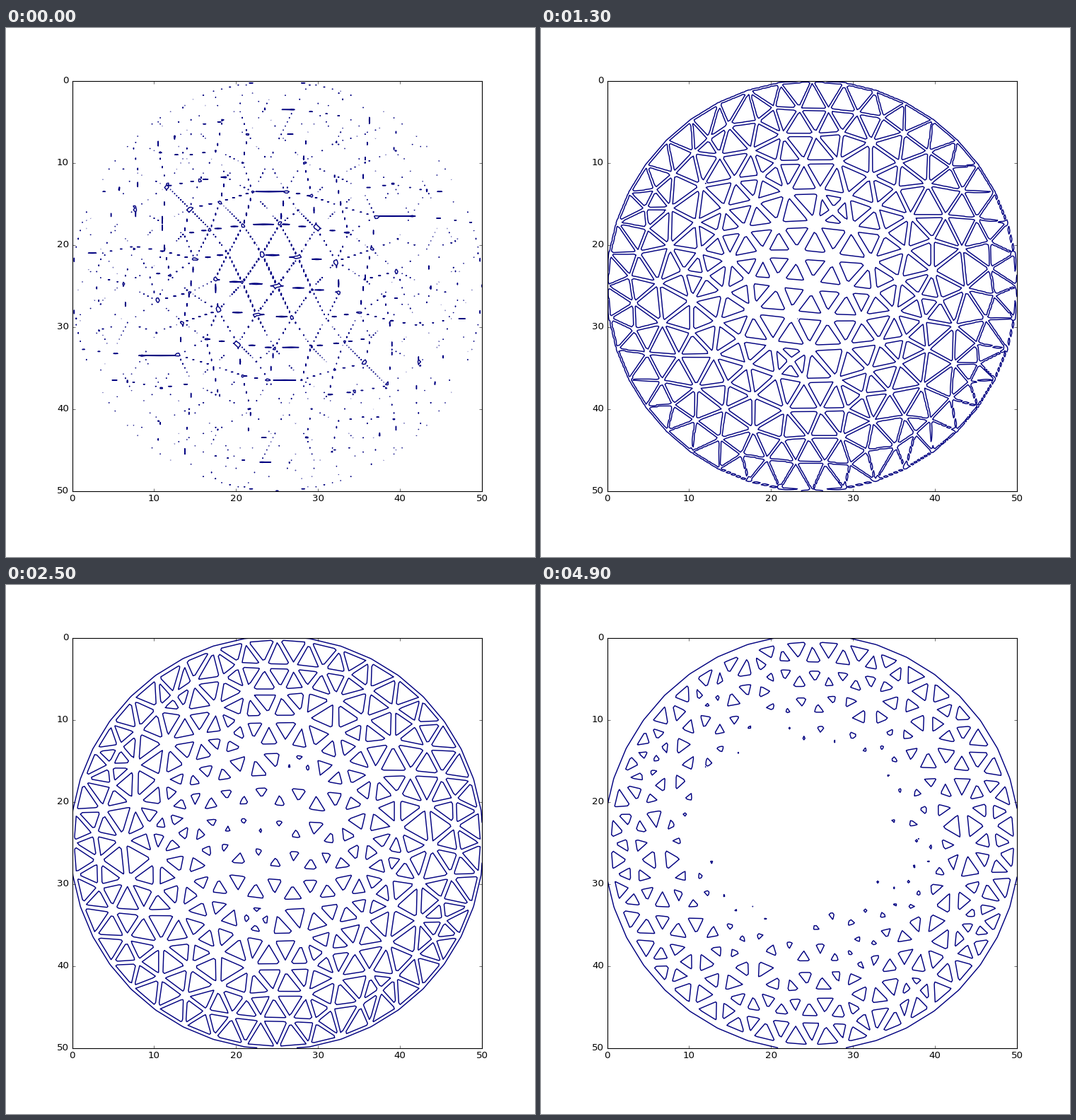
Animation, 748 px wide and 748 px high, one loop 5 s. Source, as a matplotlib script:

```python
import numpy as np
import matplotlib.pyplot as plt
from matplotlib.animation import FuncAnimation
from matplotlib.tri import Triangulation

plt.style.use("classic")
plt.rcParams.update({"font.family": "DejaVu Sans", "font.size": 12,
                     "figure.facecolor": "white"})

SIZE, DPI = 748, 80
FRAMES, INTERVAL = 50, 100
RADIUS = 25.0
NAVY = (0, 0, 0.5)


def ring(half, radius, start, warp=0, lag=0, wobble=0, wave=1, phase=0):
    """Joints around the centre, equal under a half turn.

    Angles (degrees, clockwise from the top) are bunched by warp and lag;
    wobble moves neighbours in and out by turns.
    """
    k = np.arange(half)
    base = start + 180 * k / half
    theta = np.radians(base + warp * np.sin(np.radians(2 * base - lag)))
    r = radius + wobble * (-1.0) ** k * np.sin(np.radians(wave * base + phase))
    offset = np.column_stack([r * np.sin(theta), -r * np.cos(theta)])
    return RADIUS + np.vstack([offset, -offset])


def relax(points, fixed, rounds=3, pull=0.5):
    """Ease the free joints towards the mean of their neighbours."""
    for _ in range(rounds):
        edges = Triangulation(points[:, 0], points[:, 1]).edges
        total = np.zeros_like(points)
        count = np.zeros((len(points), 1))
        for i, j in (edges.T, edges.T[::-1]):
            np.add.at(total, i, points[j])
            np.add.at(count, i, 1)
        points[fixed:] += pull * (total / count - points)[fixed:]
    return points


def build_mesh():
    rim = ring(20, RADIUS, 0)
    inner = [
        ring(22, 21.8, 7.9, warp=2.7, lag=80, wobble=-0.6, phase=90),
        ring(14, 18.6, 0, warp=-3.1, wobble=0.7, wave=2),
        ring(14, 15.6, 2, warp=3.8, lag=85, wobble=-1.1),
        ring(12, 11.7, 3.5, warp=6.7, lag=20, wobble=1.2),
        ring(6, 7.8, 6.1, wobble=-0.6, wave=2, phase=90),
        ring(1, 9.2, 16),
        ring(3, 4.4, 36.8),
        [(RADIUS, RADIUS)],
    ]
    points = relax(np.vstack([rim, *inner]), fixed=len(rim))
    return points, Triangulation(points[:, 0], points[:, 1]).edges


def strut_distance(x, y, points, edges):
    """Distance from each grid position to the nearest strut."""
    nearest = np.full(x.shape, np.inf)
    for a, b in points[edges]:
        dx, dy = b - a
        s = ((x - a[0]) * dx + (y - a[1]) * dy) / (dx * dx + dy * dy)
        s = np.clip(s, 0, 1)
        nearest = np.minimum(nearest, np.hypot(x - a[0] - s * dx, y - a[1] - s * dy))
    return nearest


def growth_rate(x, y):
    """Strut half-width gained per step, largest near the middle."""
    r = np.sqrt((x - 23.7) ** 2 + (y - 23.5) ** 2 + 1.5 ** 2)
    return 0.044 * np.exp(-r / 14.5)


axis = np.linspace(0, 2 * RADIUS, 201)
X, Y = np.meshgrid(axis, axis)
arrival = strut_distance(X, Y, *build_mesh()) / growth_rate(X, Y)

fig = plt.figure(figsize=(SIZE / DPI, SIZE / DPI), dpi=DPI)
ax = fig.add_axes([0.125, 0.125, 0.775, 0.775])
ax.set_xlim(0, 50)
ax.set_ylim(50, 0)
ax.set_xticks(range(0, 51, 10))
ax.set_yticks(range(0, 51, 10))
shown = []


def draw(step):
    while shown:
        shown.pop().remove()
    outline = ax.contour(X, Y, arrival, levels=[step + 2], colors=[NAVY], linewidths=1.3)
    shown.append(outline)
    return shown


anim = FuncAnimation(fig, draw, frames=FRAMES, interval=INTERVAL,
                     init_func=lambda: [], repeat=True, repeat_delay=0)
plt.show()
```
